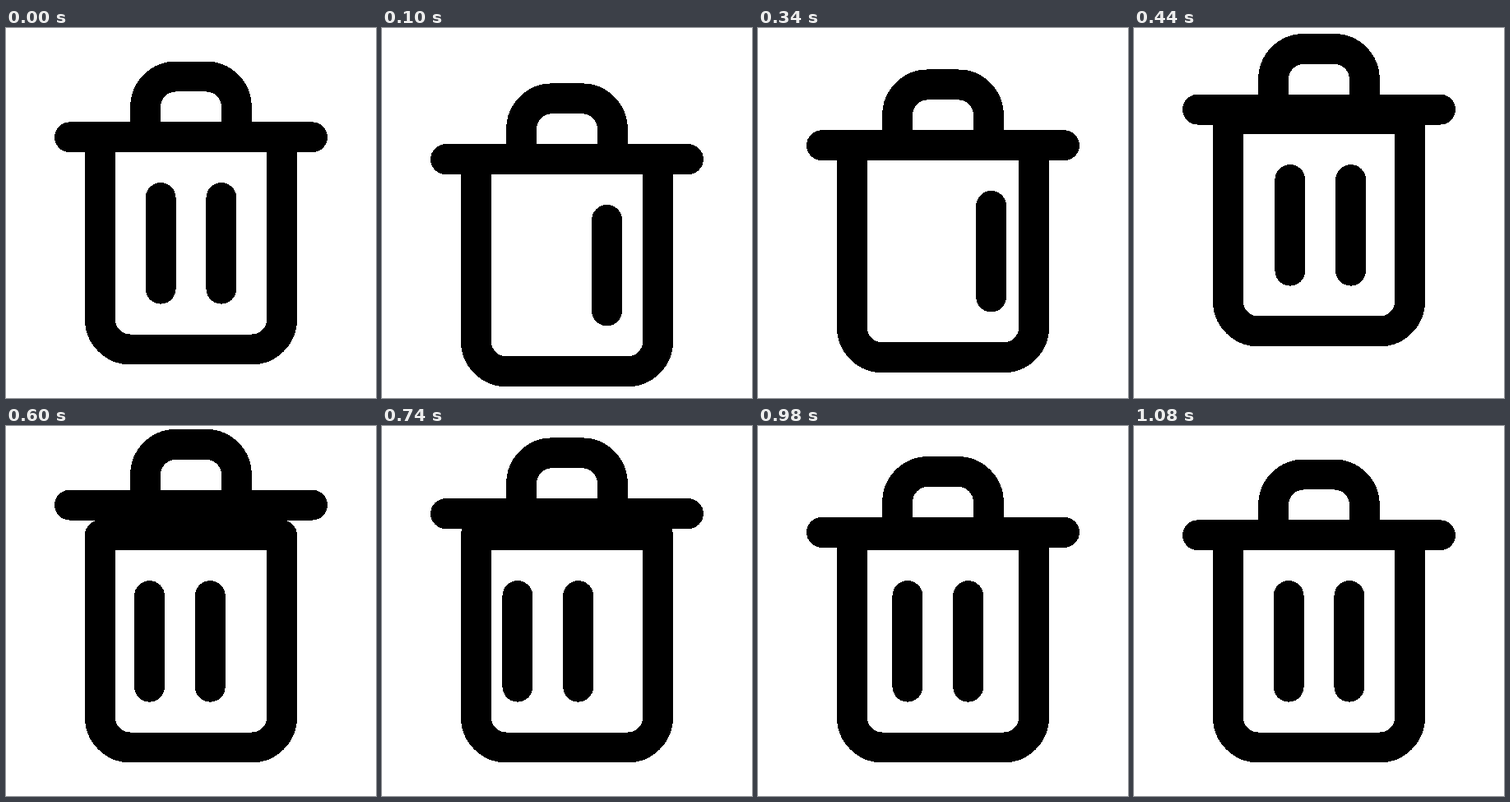
Recreate the animation shown at these times as an HTML page. Size 450 by 450 pixels, loop 2620 ms.

```html
<!DOCTYPE html>
<html lang="en">
<head>
<meta charset="utf-8">
<title>Bin</title>
<style>
  html, body { margin: 0; width: 100%; height: 100%; overflow: hidden; background: #fff; }
  svg { display: block; width: 100%; height: 100%; shape-rendering: crispEdges; }
</style>
</head>
<body>
<svg viewBox="0 0 450 450">
  <clipPath id="inside"><rect x="6" y="7" width="12" height="14" rx="1"/></clipPath>
  <g transform="translate(225 225) scale(18.44) translate(-12 -12)"
     fill="none" stroke="#000" stroke-width="2" stroke-linecap="round" stroke-linejoin="round">
    <g id="body">
      <path d="M6 7h12v12a2 2 0 0 1-2 2H8a2 2 0 0 1-2-2z"/>
      <g clip-path="url(#inside)"><path id="bars" d="M10 11v6M14 11v6"/></g>
    </g>
    <path id="lid" d="M4 7h16M9 7V5a2 2 0 0 1 2-2h2a2 2 0 0 1 2 2v2"/>
  </g>
</svg>
<script>
  const LOOP = 2620, STEP = 20, UNIT = 18.44;
  const [body, bars, lid] = ['body', 'bars', 'lid'].map(id => document.getElementById(id));

  function move(part, x, y) {
    part.setAttribute('transform', `translate(${x / UNIT} ${y / UNIT})`);
  }

  function draw() {
    const time = Math.floor(performance.now() % LOOP / STEP) * STEP;

    // Smooth progress from 0 to 1 between two times
    const ease = (start, end) => {
      const x = Math.min(1, Math.max(0, (time - start) / (end - start)));
      return x * x * (3 - 2 * x);
    };

    // The bin squats, leaps and lands
    const squat = 31, leap = 30;
    const y = squat * ease(0, 130) - (squat + leap) * ease(235, 500) + leap * ease(500, 590);

    // The bars wind up to the right, swing back past the middle, drift on and settle
    const windUp = 189.5, swing = 7.5, drift = 16.5;
    const x = windUp * ease(0, 214) - (windUp + swing) * ease(214, 474)
      - drift * ease(474, 780) + (swing + drift) * ease(780, 1080);

    // The lid pops off near the top and sinks back
    const pop = 38 * (ease(382, 540) - ease(540, 1080));

    move(body, 0, y);
    move(bars, x, 0);
    move(lid, 0, y - pop);
    requestAnimationFrame(draw);
  }
  draw();
</script>
</body>
</html>
```
